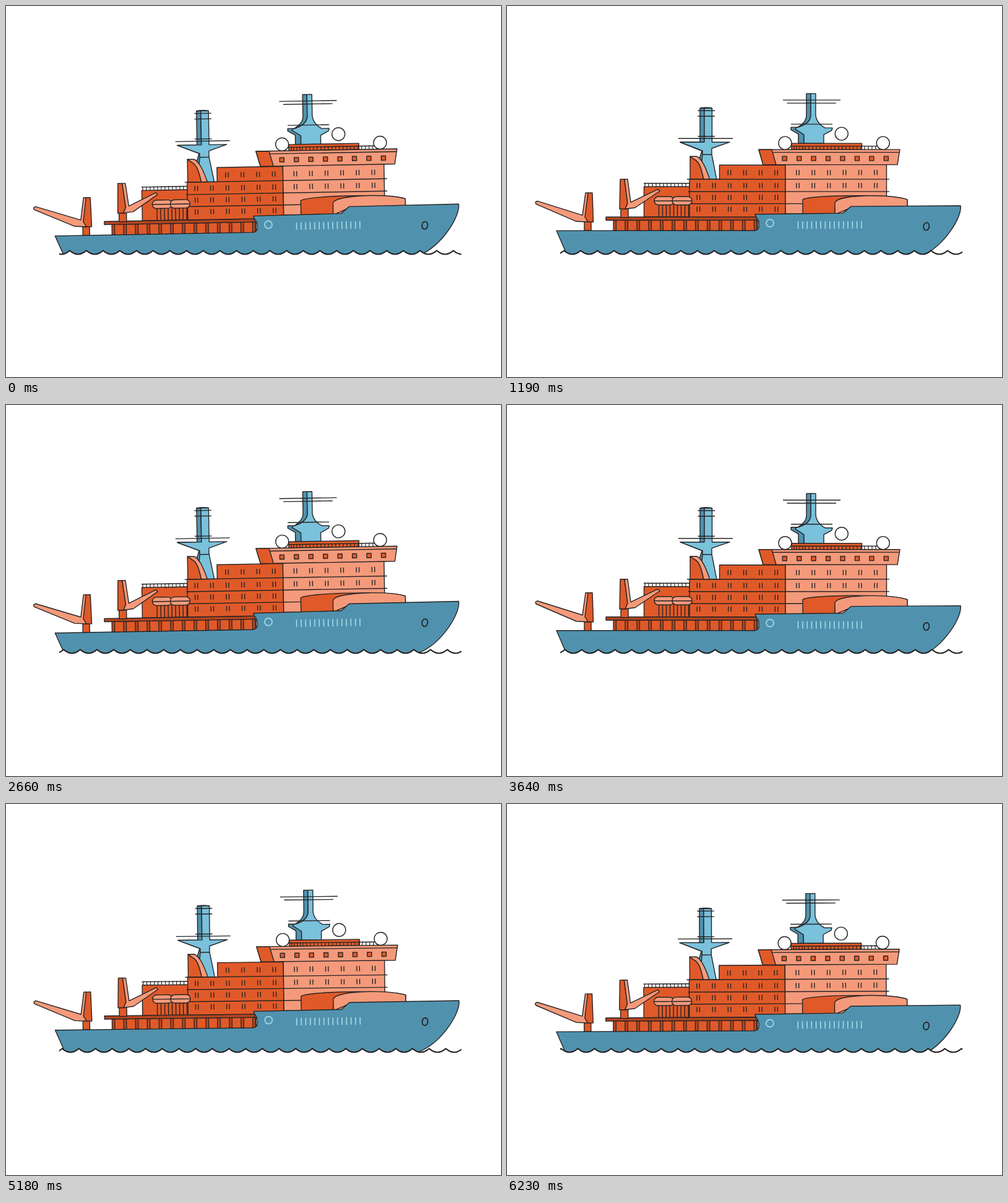
An HTML page that plays this animation: 800x600 px, repeating every 6260 ms.

```html
<!DOCTYPE html>
<html lang="en">
<head>
<meta charset="utf-8">
<title>Ship on the waves</title>
<style>
  html, body { margin: 0; width: 100%; height: 100%; overflow: hidden; background: #fff; }
  svg { display: block; width: 800px; height: 600px; }
</style>
</head>
<body>
<svg id="stage" viewBox="0 0 800 600" xmlns="http://www.w3.org/2000/svg">
  <defs><clipPath id="sea"><rect x="86" y="380" width="650" height="40"/></clipPath></defs>
  <g id="ship" stroke="#262424" stroke-width="1.4" stroke-linejoin="round" fill="none"></g>
  <path id="water" fill="#fff"/>
  <g clip-path="url(#sea)">
    <path id="waves" fill="none" stroke="#221f20" stroke-width="2.1" stroke-linejoin="round"/>
  </g>
</svg>
<script>
const LOOP = 6260, STEP = 70;
const ORANGE = '#e05a29', RUST = '#b5451f', SALMON = '#f49a7b';
const SKY = '#7ac1dc', BLUE = '#5092ae', PALE = '#a5dbe8', INK = '#262424';

const byId = id => document.getElementById(id);
const ship = byId('ship');

function add(tag, attrs) {
  const node = document.createElementNS('http://www.w3.org/2000/svg', tag);
  for (const key in attrs) node.setAttribute(key, attrs[key]);
  ship.appendChild(node);
}
const path = (d, fill = 'none', extra = {}) => add('path', { d, fill, ...extra });
const box = (x, y, width, height, fill, extra = {}) => add('rect', { x, y, width, height, fill, ...extra });
const globe = (cx, cy) => add('circle', { cx, cy, r: 10.5, fill: '#fff' });
const range = (count, start, gap) => Array.from({ length: count }, (_, i) => start + i * gap);
const level = (y, from, to) => path(`M${from} ${y}H${to}`);
const bars = (xs, top, bottom, extra) => path(xs.map(x => `M${x} ${top}V${bottom}`).join(''), 'none', extra);
const slits = (count, start, y) =>
  bars(range(count, start, 25.2).flatMap(x => [x - 2.2, x + 2.2]), y, y + 8.5);

function drawRearMast() {
  path('M312 165H319V221L315 256H308L315 234 280 220H312Z', BLUE);
  path('M319 165H331.5V220H360L331 230V240L339 281H312L316 240V234L280 220H319Z', SKY);
  path('M312 165Q322 163 331.5 165');
  level(240, 316, 331);
  [169, 178, 210.5].forEach(y => level(y, 308.5, 336));
  level(214, 277, 365);
}

function drawMainMast() {
  path('M484 141.5H491V178C490 186 483 193 467 197L480 208V222H471V207L459 200V196H470C480 190 484 184 484 177Z', BLUE);
  path('M491 141.5H499V177C500 185 505 192 514 197H526L525 201 512 208V222H480V208L466 199 467 197C483 193 490 186 491 178Z', SKY);
  level(152, 446, 539);
  level(157, 452.5, 532);
  level(191, 459, 526);
}

function drawStern() {
  // railing and lifeboat davits
  box(221.5, 292, 75, 49, ORANGE);
  level(286.5, 221, 296);
  bars(range(13, 223, 6), 286, 292, { 'stroke-width': 1.2 });
  bars(range(9, 245.5, 6), 321, 341);

  // after gallery
  box(173, 346, 232, 18, ORANGE);
  range(13, 172, 18.95).forEach(x => box(x, 346, 4.5, 17, RUST, { 'stroke-width': 1.2 }));
  box(160, 341, 243, 5.2, RUST);

  // cranes
  box(125, 349, 11, 14, ORANGE);
  path('M46 317 49 315 122 338 127 302H131L128 341 131 349 112 348 47 320Z', SALMON);
  path('M131 302H138L139.5 349H131L126 341Z', ORANGE);
  box(184, 328, 12, 14, ORANGE);
  path('M183 280H190L195 319 191 328H182Z', ORANGE);
  path('M190 280H195L200 317 244 296 247 299 207 326 191 328 195 319Z', SALMON);
}

function drawCabins() {
  path('M296 281V243L303 248C310 251 314 260 318 281Z', ORANGE);
  path('M296 243H307C316 248 322 263 328 281H318C314 260 310 251 303 248Z', SALMON);
  path('M295 280H343.5V257H450V341H295Z', ORANGE);
  path('M450 256H613.5V336H450Z', SALMON);
  level(280, 291, 618);
  level(300, 293, 618);
  level(319.5, 295, 478);
  slits(4, 359.5, 265);
  [286, 305, 324].forEach(y => slits(6, 309.5, y));
  [265, 286].forEach(y => slits(6, 470, y));
  [238, 267].forEach(x => {
    box(x, 308, 32, 13.5, SALMON, { rx: 6.5 });
    level(315, x, x + 32);
  });
}

function drawBridge() {
  box(460, 222, 113.5, 10, ORANGE);
  level(226.5, 460, 606);
  bars([464, 468, 473, 478], 226, 232, { 'stroke-width': 1.2 });
  bars(range(21, 482, 6), 226, 232, { 'stroke-width': 1.2 });
  path('M407 232H635L631 256.5H414Z', SALMON);
  path('M407 232H428L435 256.5H414Z', ORANGE);
  level(236.5, 430, 635);
  range(8, 445.2, 23.45).forEach(x => box(x, 243, 7, 7, ORANGE));
  globe(449.5, 221.5);
  globe(540.8, 206.5);
  globe(607.8, 221.5);
}

function drawHull() {
  // fore deck cover
  path('M478 337V313C490 305 620 304 647 313V326H530V337Z', ORANGE);
  path('M530 337V318C532 311 555 307 590 306.7 615 307 636 309 647 313V326H556Z', SALMON);

  path('M80 363H400C409 362 407 354 407 350C407 344 402 343 401 336.5L543 335 556 324 733 323C736 340 708 388 668 405L650 414H102Z', BLUE);
  add('circle', { cx: 425, cy: 351, r: 6, stroke: PALE, 'stroke-width': 1.7 });
  bars(range(15, 470.5, 7.32), 348, 360, { stroke: PALE, 'stroke-width': 1.6 });
  add('ellipse', { cx: 677.8, cy: 356.5, rx: 4.6, ry: 6.2, stroke: INK, 'stroke-width': 1.8, transform: 'rotate(10 677.8 356.5)' });
}

[drawRearMast, drawMainMast, drawStern, drawCabins, drawBridge, drawHull].forEach(draw => draw());

const PITCH = 26.96, CREST = 395.5, DRIFT = 0.05441;

function wavePath(time) {
  const phase = (103 - DRIFT * time) % PITCH;
  const start = phase + (phase < 0 ? PITCH : 0) + PITCH;
  let d = `M${start.toFixed(2)} ${CREST}`;
  for (let x = start; x < 760; x += PITCH) d += `q${PITCH / 2} 12 ${PITCH} 0`;
  return d;
}

const swing = (time, peak, period) => Math.cos(2 * Math.PI * (time - peak) / period);

function render(time) {
  const angle = -0.54 * (1 + swing(time, 170, 2270));
  const bob = 1.4 - 2.65 * swing(time, 800, 2240);
  ship.setAttribute('transform', `translate(0 ${bob.toFixed(3)}) rotate(${angle.toFixed(4)} 406 405)`);
  const d = wavePath(time);
  byId('waves').setAttribute('d', d);
  byId('water').setAttribute('d', d + 'V440H30V395Z');
}

const begin = performance.now();
function tick() {
  const time = (performance.now() - begin) % LOOP;
  render(Math.floor(time / STEP) * STEP);
  requestAnimationFrame(tick);
}
render(0);
requestAnimationFrame(tick);
</script>
</body>
</html>
```
